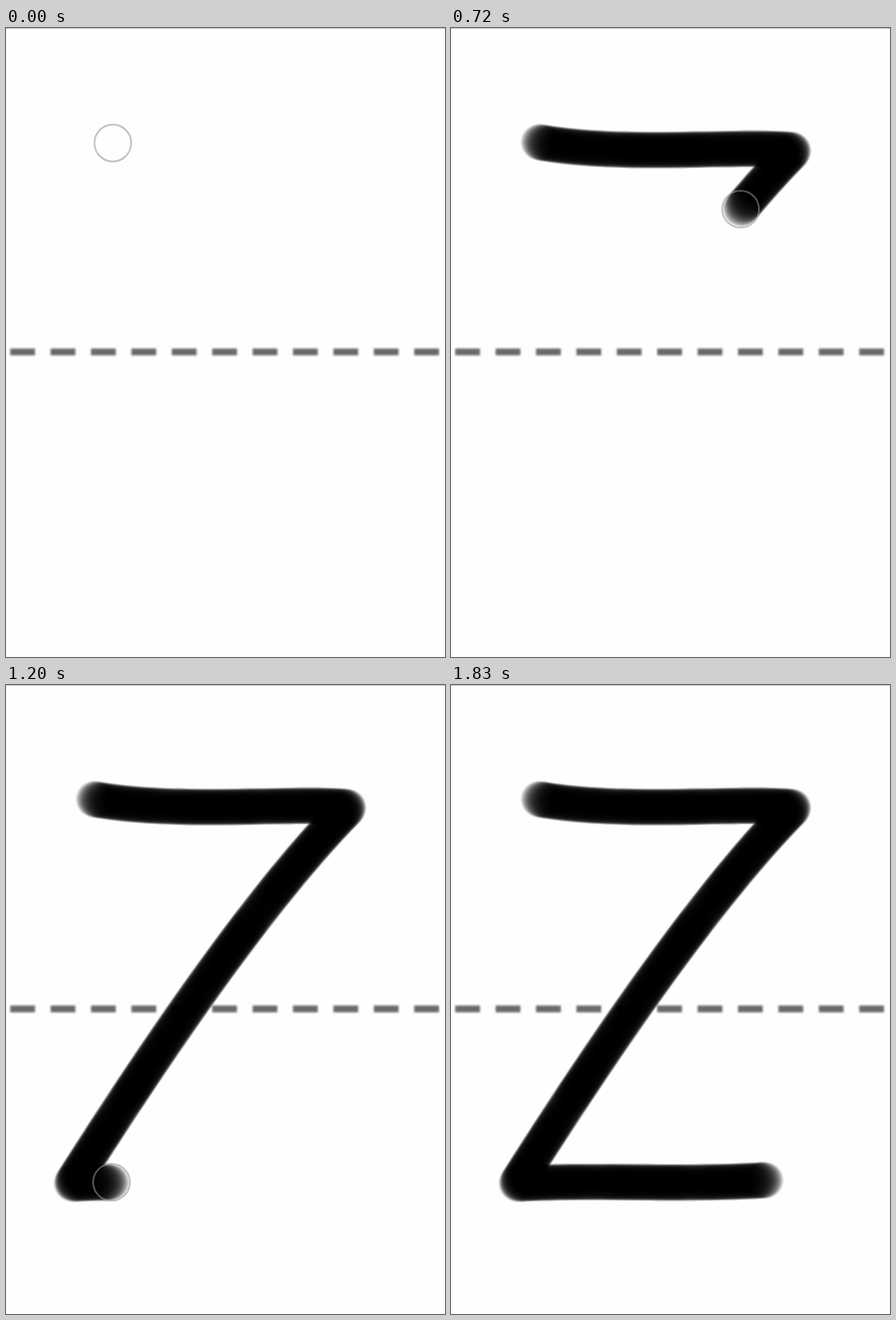
An HTML page with a canvas that plays this animation: 489 px wide and 700 px high, repeating every 4290 ms.

```html
<!DOCTYPE html>
<html lang="en">
<head>
<meta charset="utf-8">
<title>Writing the letter Z</title>
<style>
  html, body { margin: 0; width: 100%; height: 100%; overflow: hidden; background: #fefefe; }
  canvas { display: block; }
</style>
</head>
<body>
<canvas id="stage" width="489" height="700"></canvas>
<script>
const LOOP = 4290, TICK = 30;
const RADIUS = 21, SPACING = 1.5;

const linear = u => u;
const easeInOut = u => (1 - Math.cos(Math.PI * u)) / 2;

// Pen moves as Bézier curves; the pen rests between one move and the next
const moves = [
  { from: 0, to: 150, ease: linear, curve: [[119, 128], [98, 127]] },
  { from: 180, to: 560, ease: easeInOut, ink: true, curve: [[98, 127], [195, 144], [320, 130], [382, 136]] },
  { from: 560, to: 1060, ease: easeInOut, ink: true, curve: [[382, 136], [262, 257], [73, 555]] },
  { from: 1110, to: 1450, ease: easeInOut, ink: true, curve: [[73, 555], [165, 550], [250, 557], [351, 551]] },
  { from: 1460, to: 1830, ease: linear, curve: [[351, 551], [358, 487], [500, 490]] }
];
const PEN_GONE = moves[moves.length - 1].to;

const ctx = document.getElementById('stage').getContext('2d');

// De Casteljau: blend neighbouring points until one is left
function bezier(points, u) {
  while (points.length > 1) {
    points = points.slice(1).map((p, i) => p.map((v, k) => points[i][k] + (v - points[i][k]) * u));
  }
  return points[0];
}

const moveAt = t => moves.filter(m => m.from <= t).pop();

function penAt(t) {
  const { from, to, ease, curve } = moveAt(t);
  return bezier(curve, ease(Math.min((t - from) / (to - from), 1)));
}

// A faint, almost flat disc: overlapping dabs give firm sides and fading ends
function makeDab() {
  const dab = document.createElement('canvas');
  dab.width = dab.height = 2 * RADIUS;
  const c = dab.getContext('2d');
  const disc = c.createRadialGradient(RADIUS, RADIUS, 0, RADIUS, RADIUS, RADIUS);
  disc.addColorStop(0.88, 'rgba(0,0,0,0.17)');
  disc.addColorStop(1, 'rgba(0,0,0,0)');
  c.fillStyle = disc;
  c.fillRect(0, 0, 2 * RADIUS, 2 * RADIUS);
  return dab;
}

// Dabs at even distances along the inked moves
function makeDabs() {
  const dabs = [];
  let last = null;
  for (let t = 0; t < PEN_GONE; t += 0.25) {
    if (!moveAt(t).ink) continue;
    const [x, y] = penAt(t);
    if (!last || Math.hypot(x - last.x, y - last.y) >= SPACING) {
      last = { t, x, y };
      dabs.push(last);
    }
  }
  return dabs;
}

const dab = makeDab(), dabs = makeDabs();

function drawPaper() {
  ctx.fillStyle = '#fefefe';
  ctx.fillRect(0, 0, 489, 700);
  ctx.fillStyle = '#cacaca';
  ctx.fillRect(0, 0, 489, 1);
  ctx.filter = 'blur(1.2px)';
  ctx.fillStyle = '#6a6a6a';
  for (let i = 0; i < 11; i++) ctx.fillRect(4.7 + 45 * i, 356.7, 27.6, 7.6);
  ctx.filter = 'none';
}

function drawCursor(t) {
  const [x, y] = penAt(t);
  ctx.strokeStyle = 'rgba(150,150,150,0.6)';
  ctx.lineWidth = 1.8;
  ctx.beginPath();
  ctx.arc(x, y, 20.5, 0, 2 * Math.PI);
  ctx.stroke();
}

function draw(t) {
  drawPaper();
  for (const d of dabs) {
    if (d.t > t) break;
    ctx.drawImage(dab, d.x - RADIUS, d.y - RADIUS);
  }
  if (t < PEN_GONE) drawCursor(t);
}

const start = performance.now();
let shown = -1;

function frame() {
  const elapsed = (performance.now() - start) % LOOP;
  const t = Math.floor(elapsed / TICK) * TICK;
  if (t !== shown) draw(shown = t);
  requestAnimationFrame(frame);
}
frame();
</script>
</body>
</html>
```
